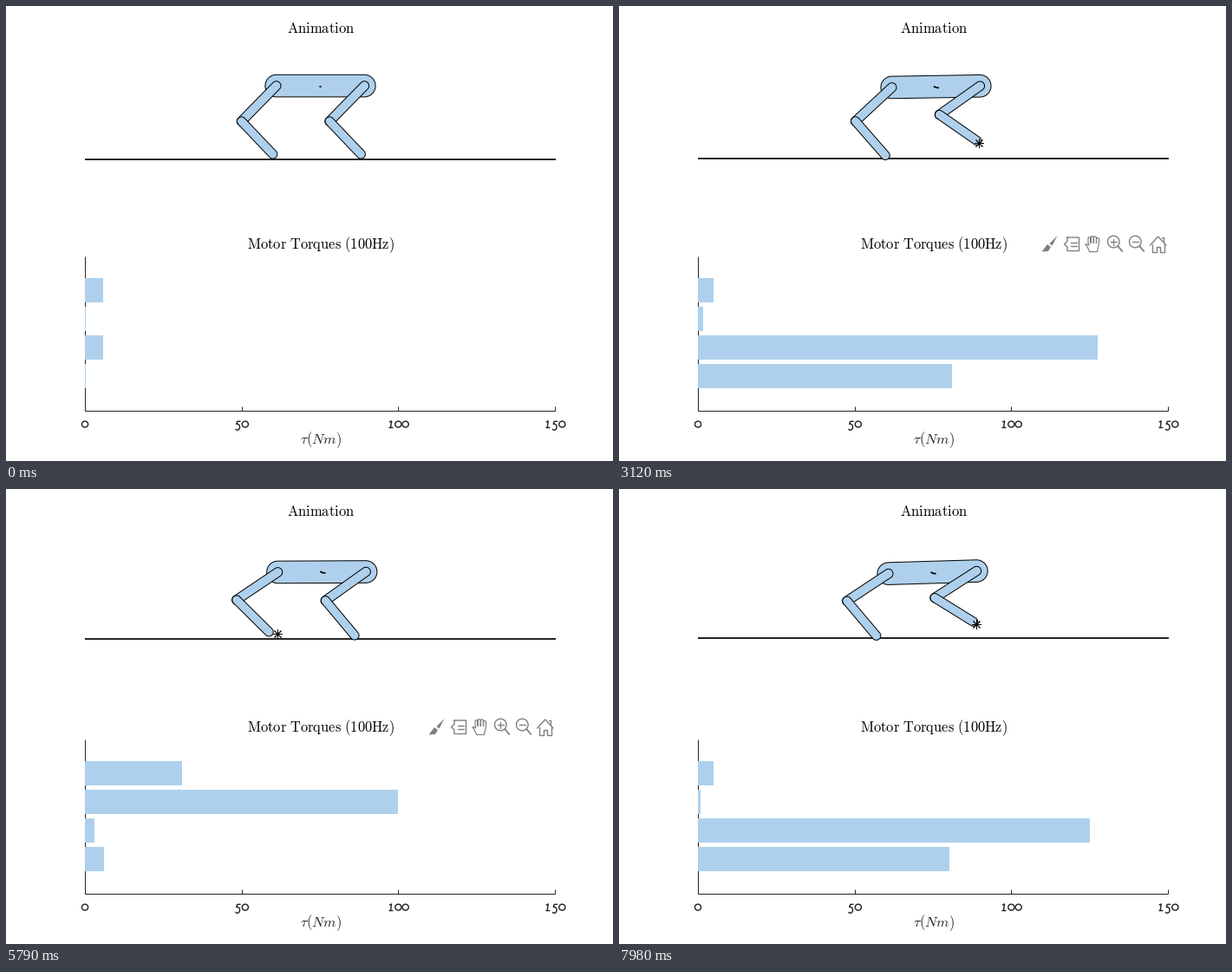
A matplotlib script that plays this animation: 700x525 px, repeating every 8 s.

```python
import numpy as np
import matplotlib.pyplot as plt
from matplotlib.animation import FuncAnimation
from matplotlib.patches import Circle, Polygon, Rectangle

plt.rcParams["mathtext.fontset"] = "cm"

W, H = 700, 525
STEP, FRAMES = 25, 320
PX = 0.72                      # points per pixel at 100 dpi
BLUE, DARK, GRAY = "#aed0ec", "#262626", "#808080"

PERIOD = 0.97                  # one full gait cycle, seconds
BODY, THIGH, SHANK = 101.6, 57.3, 52.4
UNIT = 542 / 150               # pixels per Nm
LEFT, BASE = 91, 467

fig = plt.figure(figsize=(W / 100, H / 100), dpi=100, facecolor="white")
ax = fig.add_axes([0, 0, 1, 1])
ax.set_xlim(0, W)
ax.set_ylim(H, 0)
ax.axis("off")


def line(xs, ys, color="black", width=1.0, z=2, cap="butt"):
    return ax.plot(xs, ys, color=color, lw=width * PX, zorder=z,
                   solid_capstyle=cap, solid_joinstyle="round")[0]


def label(x, y, text, color="black"):
    ax.text(x, y, text, fontsize=16.5 * PX, color=color,
            ha="center", va="baseline")


def arc(cx, cy, rx, ry, start, end, n=24):
    ang = np.radians(np.linspace(start, end, n))
    return np.column_stack([cx + rx * np.cos(ang), cy + ry * np.sin(ang)])


def capsule(a, b, r):
    turn = np.degrees(np.arctan2(b[1] - a[1], b[0] - a[0]))
    return np.vstack([arc(*b, r, r, turn - 90, turn + 90),
                      arc(*a, r, r, turn + 90, turn + 270)])


def solid(z):
    shape = Polygon([[0, 0], [1, 0], [1, 1]], closed=True, facecolor=BLUE,
                    edgecolor="black", lw=PX, zorder=z)
    return ax.add_patch(shape)


# old-style italic numerals built from short strokes
NUMERALS = {
    "0": [arc(4.2, 3.7, 3.6, 3.5, 0, 360)],
    "1": [[(2.2, 6.2), (4.7, 7.4), (3.7, 0.2)], [(1.5, 0.2), (6, 0.2)]],
    "5": [np.vstack([[(7.2, 7.1), (3.3, 6.9)],
                     arc(3.4, 0.5, 2.8, 3.5, 110, -140)])],
}


def numeral(x, base, text):
    x -= 4.15 * len(text)
    for k, ch in enumerate(text):
        for stroke in NUMERALS[ch]:
            xs, ys = np.transpose(stroke)
            line(x + 8.3 * k + xs, base - ys, DARK, 1.45)


# titles, axes and labels
label(363, 31, r"$\mathrm{Animation}$")
label(363, 280.3, r"$\mathrm{Motor\ Torques\ (100Hz)}$")
label(363, 505.3, r"$\tau(Nm)$", DARK)
line([LEFT, LEFT], [289, BASE], DARK)
line([LEFT, 633], [BASE, BASE], DARK)
for value in range(0, 151, 50):
    x = LEFT + value * UNIT
    line([x, x], [BASE - 5, BASE], DARK)
    numeral(x, 486.3, str(value))

bars = [ax.add_patch(Rectangle((LEFT, 314 + 33 * k), 0, 28, facecolor=BLUE,
                               lw=0, zorder=3)) for k in range(4)]

# robot parts
ground = line([LEFT, 633.5], [0, 0], width=1.7, z=4)
torso = solid(5)
trail = line([], [], width=1.7, z=6, cap="round")
legs = [(solid(7), solid(8)), (solid(9), solid(10))]
star, = ax.plot([], [], ls="", marker=(8, 2, 0), ms=11 * PX, color="black",
                mew=0.9 * PX, zorder=12)


def toolbar():
    parts = []

    def stroke(pts, width=1.4):
        parts.append(line(*np.transpose(pts), GRAY, width, 3, "round"))

    # brush
    parts.append(ax.add_patch(Polygon(
        [(505.5, 265), (499.5, 276.5), (496.5, 274)], fc=GRAY, zorder=3)))
    parts.append(ax.add_patch(Polygon(
        [(494, 275), (498, 278), (495, 283), (487.5, 283.5)],
        fc=GRAY, zorder=3)))
    # data tip
    stroke([(517, 267), (530.5, 267), (530.5, 282.5), (517, 282.5),
            (517, 278), (513.5, 274.7), (517, 271.5), (517, 267)])
    for y in (272.5, 277):
        stroke([(520.5, y), (527.5, y)])
    # hand: thumb, four arched fingers, palm
    hand = [(543, 283.5), (538, 274.5), (542, 276)]
    for k in range(4):
        x, top = 542.5 + 3.2 * k, 267 + 0.7 * (k - 1.3) ** 2
        hand += [(x - 1.4, 273.5), *arc(x, top, 1.5, 1.5, 180, 360, 6),
                 (x + 1.4, 273.5)]
    stroke(hand + [(551.5, 283.5), (543, 283.5)], 1.2)
    # magnifiers
    for x in (570.3, 595.3):
        parts.append(ax.add_patch(Circle((x, 272), 6.8, fill=False, ec=GRAY,
                                         lw=1.4 * PX, zorder=3)))
        stroke([(x + 5, 277), (x + 10, 283)], 1.8)
        stroke([(x - 3.5, 272), (x + 3.5, 272)])
    stroke([(570.3, 268.5), (570.3, 275.5)])
    # house, mirrored about its middle
    stroke([(612.5, 276), (621.7, 266), (631, 276)])
    for side in (-1, 1):
        stroke([(621.8 + side * dx, y) for dx, y in
                ((6.8, 274.5), (6.8, 283.5), (2.3, 283.5), (2.3, 277.5), (0, 277.5))])
    stroke([(625.5, 266.5), (628, 266.5), (628, 271.5)])
    return parts


icons = toolbar()


def glide(t, a, b, start, end):
    s = np.clip((t - start) / (end - start), 0, 1)
    return a + (b - a) * s * s * (3 - 2 * s)


def knee_of(hip, foot):
    d = foot - hip
    dist = np.hypot(*d)
    along = (THIGH**2 - SHANK**2 + dist**2) / (2 * dist)
    out = np.sqrt(max(THIGH**2 - along**2, 0))
    d = d / dist
    return hip + along * d + out * np.array([-d[1], d[0]])


def foot_of(t, hip, floor, phase, load):
    """Foot centre and swing target (None while the leg carries load)."""
    back = glide(t, -4, -14, 0.5, 7)
    rest = glide(t, 6, load, 0, 0.6)
    if t > 0 and phase < 0.5:
        lift = np.sin(2 * np.pi * phase)
        rise = 6 + (14.2 - 0.45 * t) * lift**2
        x = hip[0] + back * (1 - lift) - 3.5 * lift
        foot = np.array([x, floor - rise - 1.5 - 1.5 * lift**2])
        return foot, (hip[0] - 0.8, floor - rise)
    settle = max(0, 1 - (2 * phase - 1) / 0.06) if t > 0 else 0
    return np.array([hip[0] + back, floor - rest - (7.5 - rest) * settle]), None


def torques(t, phase):
    """Front hip, front knee, rear hip-side, rear knee-side loads in Nm."""
    if t == 0:
        return [5.7, 0, 5.7, 0]
    u = 2 * phase % 1
    idle = [5.6 - 2 * u, abs(4.8 * np.cos(1.05 * np.pi * u))]
    push = 108 + 340 * u if u < 0.1 else 147 - 50 * u
    if phase < 0.5:
        return idle + [push, 88 - 18 * u]
    return [49 - 20 * u, push - 2] + [idle[0] - 0.9, idle[1] + 1.2]


def update(i):
    t = i * STEP / 1000
    phase = t / PERIOD % 1
    ramp = min(t, 1)
    floor = glide(t, 177, 172.4, 0, 8.4)
    x = 362.5 + ramp * (1.2 - 2.2 * np.cos(2 * np.pi * (t - 1.9) / 3))
    y = glide(t, 92.1, 96.1, 1.3, 6.8)
    tilt = 0.9 * ramp + 0.27 * t * np.sin(2 * np.pi * phase)
    rear = np.array([x - BODY / 2, y + tilt / 2])
    front = np.array([x + BODY / 2, y - tilt / 2])

    ground.set_ydata([floor, floor])
    torso.set_xy(capsule(rear, front, 12.8))
    mid = 362.5 + 3.6 * np.sin(np.pi * t / 8)
    mark = glide(t, 93, 97, 1.5, 7.5)
    half = 0.2 + 2.3 * ramp
    trail.set_data([mid - half, mid, mid + half],
                   [mark - 0.7 * ramp, mark + 0.4 * ramp, mark + 0.7 * ramp])

    target = None
    gait = [(rear, (phase + 0.5) % 1, 3.2), (front, phase, 4.5)]
    for (thigh, shank), (hip, ph, load) in zip(legs, gait):
        foot, goal = foot_of(t, hip, floor, ph, load)
        knee = knee_of(hip, foot)
        thigh.set_xy(capsule(hip, knee, 5.3))
        shank.set_xy(capsule(knee, foot, 5.1))
        target = goal or target
    star.set_data(*([[target[0]], [target[1]]] if target else [[], []]))

    for bar, value in zip(bars, torques(t, phase)):
        bar.set_width(value * UNIT + 0.8)
    for part in icons:
        part.set_visible(0.9 <= t < 7.3)
    return [ground, torso, trail, star, *bars]


anim = FuncAnimation(fig, update, frames=FRAMES, interval=STEP,
                     init_func=lambda: update(0), repeat=True,
                     repeat_delay=0, blit=False)
plt.show()
```
